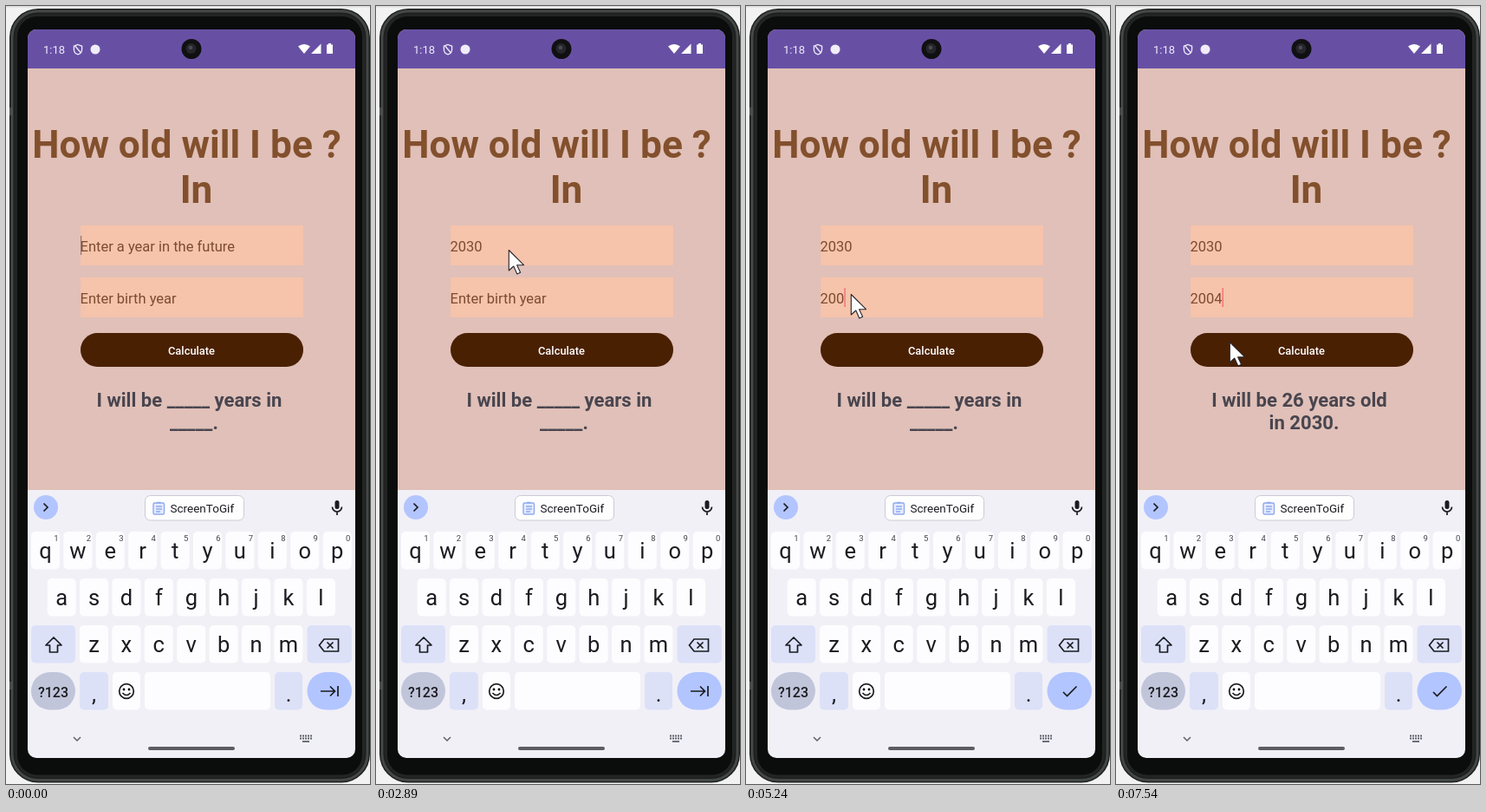
An HTML page that plays this animation: 420x897 px, repeating every 8 s.

```html
<!DOCTYPE html>
<html lang="en">
<head>
<meta charset="utf-8">
<title>How old will I be?</title>
<style>
  html, body { margin: 0; width: 100%; height: 100%; overflow: hidden; background: #f2f2f2; }
  svg { position: absolute; left: 0; top: 0; display: block; }
  text { font-family: Roboto, sans-serif; }
  .title { font-size: 44.2px; font-weight: 700; fill: #83502d; text-anchor: middle; }
  .field { font-size: 16.5px; fill: #7c4c2f; }
  .result { font-size: 22.1px; font-weight: 700; fill: #49454f; text-anchor: middle; }
  .key { font-size: 25.5px; fill: #1b1b21; text-anchor: middle; }
  .hint { font-size: 9.5px; fill: #45464f; text-anchor: middle; }
  .line { fill: none; stroke: #1b1b21; stroke-width: 1.7; }
</style>
</head>
<body>
<svg width="420" height="897" viewBox="0 0 420 897">
  <defs>
    <clipPath id="screenClip"><rect x="25" y="27" width="378" height="840" rx="10"/></clipPath>
    <clipPath id="buttonClip"><rect x="86" y="377" width="257" height="39" rx="19.5"/></clipPath>
    <radialGradient id="wave">
      <stop offset=".75" stop-color="#fff" stop-opacity=".13"/>
      <stop offset="1" stop-color="#fff" stop-opacity="0"/>
    </radialGradient>
  </defs>

  <!-- phone body -->
  <rect width="420" height="1.5" fill="#dcdcdc"/>
  <rect x="4" y="3" width="416" height="892.5" rx="33" fill="#1d1f1e"/>
  <rect x="7" y="6" width="410" height="886.5" rx="30" fill="none" stroke="#434745" stroke-width="3"/>
  <rect x="10" y="9" width="404" height="880.5" rx="27" fill="#232524"/>
  <rect x="13" y="12" width="398" height="874.5" rx="23" fill="#0b0c0c"/>
  <path d="M4 117h4v9h-4zM4 779h4v9h-4z" fill="#4a4d4b"/>

  <g clip-path="url(#screenClip)">
    <rect x="25" y="27" width="378" height="531" fill="#e0c0b8"/>
    <rect x="25" y="27" width="378" height="45" fill="#6750a4"/>
    <rect x="25" y="558" width="378" height="309" fill="#f1f0f7"/>
  </g>

  <!-- status bar -->
  <text x="43" y="55" font-size="13" fill="#f1ecfa">1:18</text>
  <path d="M83 44.5l4.6 1.8v3.6c0 3-2 5.2-4.6 6-2.6-.8-4.6-3-4.6-6v-3.6zM80 46.5l6 7" fill="none" stroke="#f1ecfa" stroke-width="1.3"/>
  <circle cx="103" cy="50" r="5.5" fill="#f1ecfa"/>
  <path d="M337 46.5q7-5 14 0l-7 8.5zM363.5 43.5v11.5h-11.5z" fill="#fff"/>
  <path d="M372 44.5v-1.5h3v1.5h2v10.5h-7v-10.5z" fill="#fff"/>
  <circle cx="214" cy="49.5" r="11.5" fill="#101012"/>
  <circle cx="213.5" cy="49" r="6" fill="#25252b"/>
  <circle cx="213" cy="48" r="2.3" fill="#4a4a52"/>

  <!-- form -->
  <text class="title" x="208.5" y="175">How old will I be ?</text>
  <text class="title" x="219.5" y="227">In</text>
  <path d="M86 253h257v46h-257zM86 313h257v46h-257z" fill="#f6c3ab"/>
  <text id="future" class="field" x="85.5" y="282.5"></text>
  <text id="birth" class="field" x="85.5" y="343"></text>
  <rect id="caret" width="1.2" height="22"/>
  <g clip-path="url(#buttonClip)">
    <rect x="86" y="377" width="257" height="39" fill="#4a2003"/>
    <circle id="ripple" cx="131" cy="390" r="0" fill="url(#wave)"/>
  </g>
  <text x="214" y="402" font-size="12.9" font-weight="500" fill="#fff" text-anchor="middle">Calculate</text>
  <text id="line1" class="result" x="211.5" y="462"></text>
  <text id="line2" class="result" x="217" y="488"></text>

  <!-- keyboard toolbar -->
  <circle cx="46" cy="578" r="14" fill="#b2c5ff"/>
  <path class="line" d="M43.5 573.5l4.5 4.5-4.5 4.5"/>
  <g id="chip">
    <rect x="160.5" y="564.5" width="114" height="28.5" rx="6" fill="#fefeff" stroke="#cbcbd4"/>
    <g fill="none" stroke="#8ea9f0" stroke-width="1.4">
      <rect x="170" y="573" width="12.5" height="13" rx="1.5" fill="#e6ecff"/>
      <path d="M173 577h7M173 580h7M173 583h5M174 572.5h4.5"/>
    </g>
    <text x="189.5" y="583.5" font-size="13.5" fill="#1b1b21">ScreenToGif</text>
  </g>
  <rect x="379.5" y="570" width="5" height="10" rx="2.5" fill="#1b1b21"/>
  <path class="line" d="M376.5 577.5a5.5 5.5 0 0 0 11 0M382 583v4"/>

  <g id="keys"></g>
  <path class="line" d="M55 728l9 9h-4.5v8h-9v-8h-4.5z" stroke-linejoin="round"/>
  <path class="line" d="M367 730h16.5v14h-16.5l-5.5-7zM370.500 733.5l7 7M377.5 733.5l-7 7"/>
  <text x="54.5" y="797" font-size="16" font-weight="500" fill="#1b1b21" text-anchor="middle">?123</text>
  <circle class="line" cx="139" cy="790" r="8.3"/>
  <circle cx="136" cy="788" r="1.4"/><circle cx="142" cy="788" r="1.4"/>
  <path class="line" d="M134.5 792q4.5 5 9 0"/>
  <path id="enter" class="line"/>

  <!-- navigation bar -->
  <path d="M78 843l4 4 4-4" fill="none" stroke="#5f606a" stroke-width="1.5"/>
  <rect x="164" y="854" width="100" height="4" rx="2" fill="#5c5c62"/>
  <path d="M339 841.5h14M339 844.5h14" stroke="#5f606a" stroke-width="2" stroke-dasharray="2 1"/>
  <path d="M342 848h8" stroke="#5f606a" stroke-width="1.8"/>

  <g id="pointer">
    <path d="M.3 .5v23.5l5.500-5 4 9 3.800-1.700-4-8.600h7.900z" fill="#fff" stroke="#26262c" stroke-width="1.1" stroke-linejoin="round"/>
    <circle id="halo" r="18" fill="#ff0" fill-opacity=".47"/>
  </g>
</svg>
<script>
const $ = id => document.getElementById(id);
const LOOP = 8000, STEP = 70, PITCH = 37.4;

// Keyboard keys
const keys = [];
const addKey = (x, y, w, fill = '#fdfdff', r = 5) =>
  keys.push(`<rect x="${x}" y="${y}" width="${w}" height="43.5" rx="${r}" fill="${fill}"/>`);
const addLabel = (x, y, label, cls = 'key') =>
  keys.push(`<text class="${cls}" x="${x}" y="${y}">${label}</text>`);

[['qwertyuiop', 29, 606], ['asdfghjkl', 47.7, 660], ['zxcvbnm', 85, 714]].forEach(([row, x0, y], r) =>
  [...row].forEach((letter, i) => {
    const x = x0 + PITCH * i;
    addKey(x, y, 33);
    addLabel(x + 16.5, y + 30.5, letter);
    if (r === 0) addLabel(x + 29, y + 11, (i + 1) % 10, 'hint');
  }));
addKey(29, 714, 51, '#dce1f8');
addKey(347.5, 714, 51.5, '#dce1f8');
addKey(29, 768, 51, '#c0c5da', 21.75);
addKey(85, 768, 33, '#dce1f8');
addKey(123, 768, 32);
addKey(160, 768, 145);
addKey(310, 768, 32, '#dce1f8');
addKey(347.5, 768, 51.5, '#b2c5ff', 21.75);
addLabel(101.5, 802, ',');
addLabel(326, 802, '.');
$('keys').innerHTML = keys.join('');

// Timeline
const FUTURE = [1810, 2010, 2280, 2410];
const BIRTH = [4710, 5110, 5240, 5500];
const CARET = [[0, 1], [400, 0], [940, 1], [2890, 0], [3390, 1], [4230, 0], [4710, 1], [5970, 0], [6470, 1], [6970, 0], [7470, 1]];
const HALO = [[940, 1210], [3500, 3770], [6640, 6780]];
const MOVES = [
  { from: 110, to: 810, a: [333, 820], c: [178, 410], b: [153, 281] },
  { from: 2940, to: 3500, a: [153, 281], c: [138, 312], b: [121, 332] },
  { from: 6040, to: 6240, a: [121, 332], c: [123, 360], b: [129, 384] },
  { from: 6320, to: 6530, a: [129, 384], c: [130, 386], b: [131, 387] }
];

const clamp = v => Math.max(0, Math.min(1, v));
const within = (t, [a, b]) => t >= a && t < b;
const typed = (t, times) => times.filter(at => t >= at).length;

function pointerAt(t) {
  const m = MOVES.filter(move => t >= move.from).pop() || MOVES[0];
  const n = Math.round((m.to - m.from) / STEP);
  const p = clamp(Math.floor((t - m.from) / STEP) / n);
  const k = p * (2 - p);
  return m.a.map((a, i) => (1 - k) ** 2 * a + 2 * k * (1 - k) * m.c[i] + k * k * m.b[i]);
}

function chipAt(t) {
  if (!within(t, [1070, 1340])) return [1, 1];
  return t < 1140 ? [.65, .3] : t < 1210 ? [.81, .75] : [.94, .92];
}

function draw(t) {
  const nFuture = typed(t, FUTURE), nBirth = typed(t, BIRTH);
  $('future').textContent = nFuture ? '2030'.slice(0, nFuture) : 'Enter a year in the future';
  $('birth').textContent = nBirth ? '2004'.slice(0, nBirth) : 'Enter birth year';

  const second = t >= 3700;
  const caret = $('caret');
  caret.setAttribute('x', 86 + 9.15 * (second ? nBirth : nFuture));
  caret.setAttribute('y', second ? 325 : 265);
  caret.setAttribute('fill', t < 110 ? '#9a7468' : '#f4606e');
  caret.setAttribute('opacity', CARET.filter(c => t >= c[0]).pop()[1]);

  const [x, y] = pointerAt(t);
  $('pointer').setAttribute('transform', `translate(${x} ${y})`);
  $('pointer').setAttribute('opacity', t < 110 ? 0 : 1);
  $('halo').setAttribute('opacity', HALO.some(h => within(t, h)) ? 1 : 0);

  const [scale, alpha] = chipAt(t);
  $('chip').setAttribute('transform', `translate(217.5 578.5) scale(${scale}) translate(-217.5 -578.5)`);
  $('chip').setAttribute('opacity', alpha);

  $('ripple').setAttribute('r', Math.max(0, Math.min(320, (t - 6600) * 1.2)));
  $('ripple').setAttribute('opacity', 1 - clamp((t - 6900) / 640));

  const done = t >= 6850;
  $('line1').textContent = done ? 'I will be 26 years old' : 'I will be _____ years in';
  $('line2').textContent = done ? 'in 2030.' : '_____.';
  $('enter').setAttribute('d', second && t >= 3770
    ? 'M366 791l4.5 4.5 11-11'
    : 'M363 790h16M374 784.5l5.5 5.5-5.5 5.5M383 784v12');
}

const start = performance.now();
function tick() {
  draw((performance.now() - start) % LOOP);
  requestAnimationFrame(tick);
}
tick();
</script>
</body>
</html>
```
